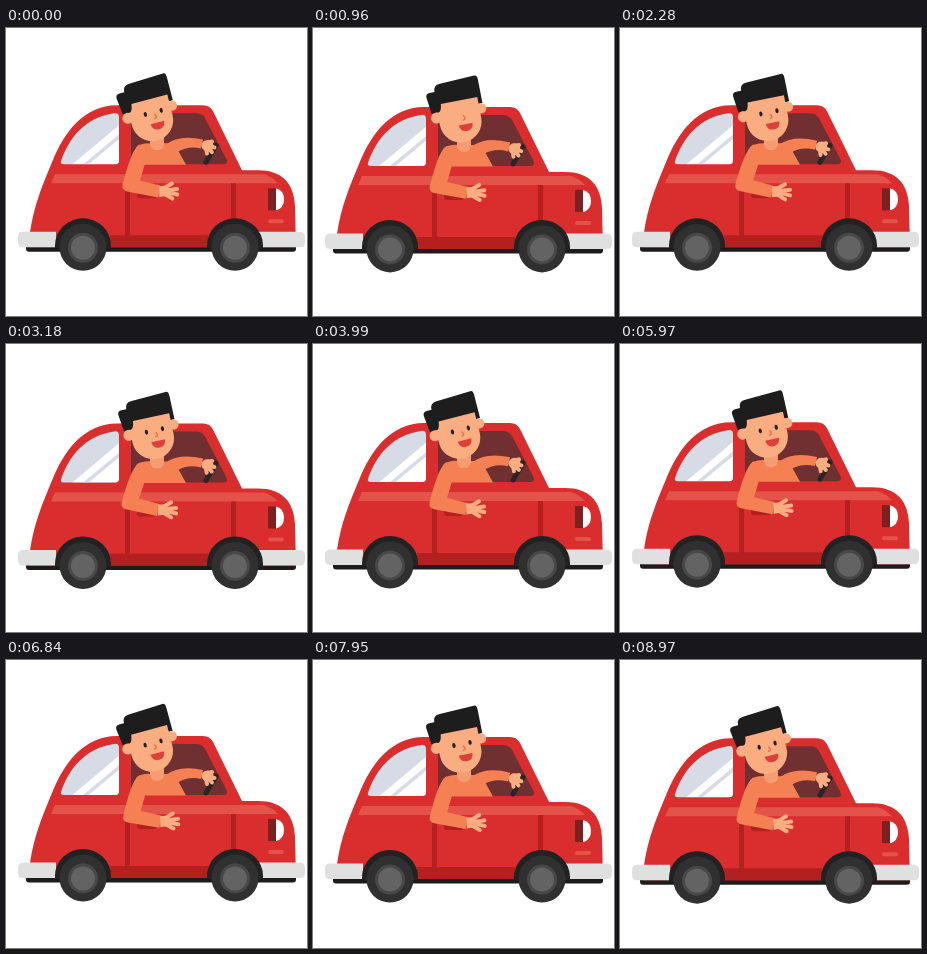
These frames come from a looping animation (301x288 px, 9000 ms). An HTML page:

```html
<!DOCTYPE html>
<html lang="en">
<head>
<meta charset="utf-8">
<title>Driving a red car</title>
<style>
  html, body { margin: 0; width: 100%; height: 100%; overflow: hidden; background: #fff; }
  svg { display: block; width: 100vw; height: 100vh; }
</style>
</head>
<body>
<svg viewBox="0 0 301 288">
  <defs>
    <clipPath id="pane"><path id="glass" d="M55 135C63 111 80 91 108 87Q113 86 113 91V134Q113 138 109 138H58Q54 138 55 135Z"/></clipPath>
    <g id="wheel">
      <path d="M-28 3V0A28 27 0 0 1 28 0V3Z" fill="#222"/>
      <circle r="23.5" cy="2" fill="#303030"/>
      <circle r="15" cy="2.5" fill="#484848"/>
      <circle r="12" cy="2.5" fill="#636363"/>
    </g>
  </defs>

  <g id="car">
    <rect x="20" y="216" width="270" height="9.5" rx="3" fill="#1c1c1c"/>
    <path d="M24 206C28 179 36 160 46 136C58 106 78 79 111 79H197Q204 79 207 85L236 144H252C276 144 288 157 289 180L290 221H24Z" fill="#da2d2e"/>
    <path d="M45 157L49 148H258Q267 151 272 157Z" fill="#e4534a"/>
    <path d="M104 209H202V221H104ZM119 157H124V209H119ZM225 157H230V209H225Z" fill="#b42020"/>

    <use href="#glass" fill="#d7dbe5"/>
    <g clip-path="url(#pane)">
      <path d="M64 140L114 98V140Z" fill="#fff"/>
      <path d="M75 142L116 108" stroke="#d7dbe5" stroke-width="3.5"/>
    </g>
    <path d="M125 87H190Q196 87 199 92L220 132Q223 138 217 138H125Z" fill="#702f30"/>
    <rect x="131" y="164" width="20" height="8" rx="3" fill="#b42020"/>

    <path d="M262 162H270V184H262Z" fill="#7c2020"/>
    <path d="M270 162Q278 164 278 173T270 184Z" fill="#fff"/>
    <rect x="262" y="193" width="16" height="4" rx="2" fill="#e4534a"/>

    <path d="M50 205.5H17Q12 205.5 12 211V216Q12 221 17 221H50ZM251 205.5H294Q299 205.5 299 211V216Q299 221 294 221H251Z" fill="#e0e0e0"/>
    <use href="#wheel" x="77" y="219"/>
    <use href="#wheel" x="229" y="219"/>

    <path d="M200 136L210 119" stroke="#2b2427" stroke-width="5" stroke-linecap="round"/>
    <path d="M130 121Q136 116 146 117H160Q171 116 172 124L180 138.500H130Z" fill="#f58053"/>
    <g id="reach">
      <path d="M160 118Q173 108 197 113L195 122Q182 119 171 126Z" fill="#f58053"/>
      <ellipse cx="201.500" cy="119" rx="6" ry="5.500" fill="#f9ad81"/>
      <g stroke="#f9ad81" stroke-width="4" stroke-linecap="round">
        <path d="M202 116L206 115M203 120L208.500 121M202 121L206 125.500M200 121L201 127"/>
      </g>
    </g>
    <path d="M144 105H158V118Q157 124 151 124T144 118Z" fill="#f59c72"/>
    <g id="arm">
      <path d="M134 118C126 121 119 146 115.500 158Q114 164 121 165L151 171.500L153 159.500L133 154L139 136Z" fill="#f58053"/>
      <path d="M152 160L160 160V170L152 171Z" fill="#f9ad81"/>
      <path d="M156 163L165 158M157 165L170 163.500M158 166L170 169M157 168L165 173" stroke="#f9ad81" stroke-width="4" stroke-linecap="round"/>
    </g>

    <g id="head">
      <g transform="translate(145 90) rotate(-15)">
        <path d="M-21 -20V4A21 21 0 0 0 21 4V-20Z" fill="#f9ad81"/>
        <path d="M-27 -9L-29 -26Q-29 -30 -25 -30H-20Q-20 -37 -13 -37L22 -38.500Q25 -39 25 -34V-10H21V-17H-16Q-17 -9 -20 -9Z" fill="#1d1d1d"/>
        <circle cx="-23" cy="-4" r="5.500" fill="#f9ad81"/>
        <circle cx="23" cy="-5" r="5" fill="#f9ad81"/>
        <g id="eyes" fill="#252020">
          <ellipse cx="-5.200" rx="1.600" ry="2.500"/>
          <ellipse cx="11.200" rx="1.600" ry="2.500"/>
        </g>
        <path d="M4 -1Q6.500 3 3 3" fill="none" stroke="#e8744f" stroke-width="1.500" stroke-linecap="round"/>
        <path d="M-2.500 7.500H11.500Q11 14.500 4.500 14.500T-2.500 7.500Z" fill="#dc4038"/>
      </g>
    </g>
  </g>
</svg>
<script>
  const LOOP = 9000;
  const part = id => document.getElementById(id);
  const car = part('car'), head = part('head'), reach = part('reach');
  const arm = part('arm'), eyes = part('eyes');
  const move = (el, value) => el.setAttribute('transform', value);

  function draw() {
    const t = performance.now() % LOOP;
    // A cosine with the given cycles per loop, peaking at the given part of its cycle.
    const wave = (cycles, peak) => Math.cos((t / LOOP * cycles - peak) * Math.PI * 2);
    const bounce = wave(3, 0.83) + 1.8 * wave(24, 0.62) - 0.8;
    const sway = 0.5 + 0.5 * wave(13, 0.4);
    const lift = 0.5 + 0.5 * wave(9, 0.75);
    const blink = Math.abs(t % 4500 - 960) < 75;

    move(car, `translate(0 ${bounce})`);
    move(head, `rotate(${4 * sway} 150 116)`);
    move(reach, `rotate(${3 * sway} 165 118)`);
    move(arm, `rotate(${-3 * lift} 136 120)`);
    move(eyes, `translate(0 -3.3) scale(1 ${blink ? 0 : 1})`);
    requestAnimationFrame(draw);
  }
  draw();
</script>
</body>
</html>
```
